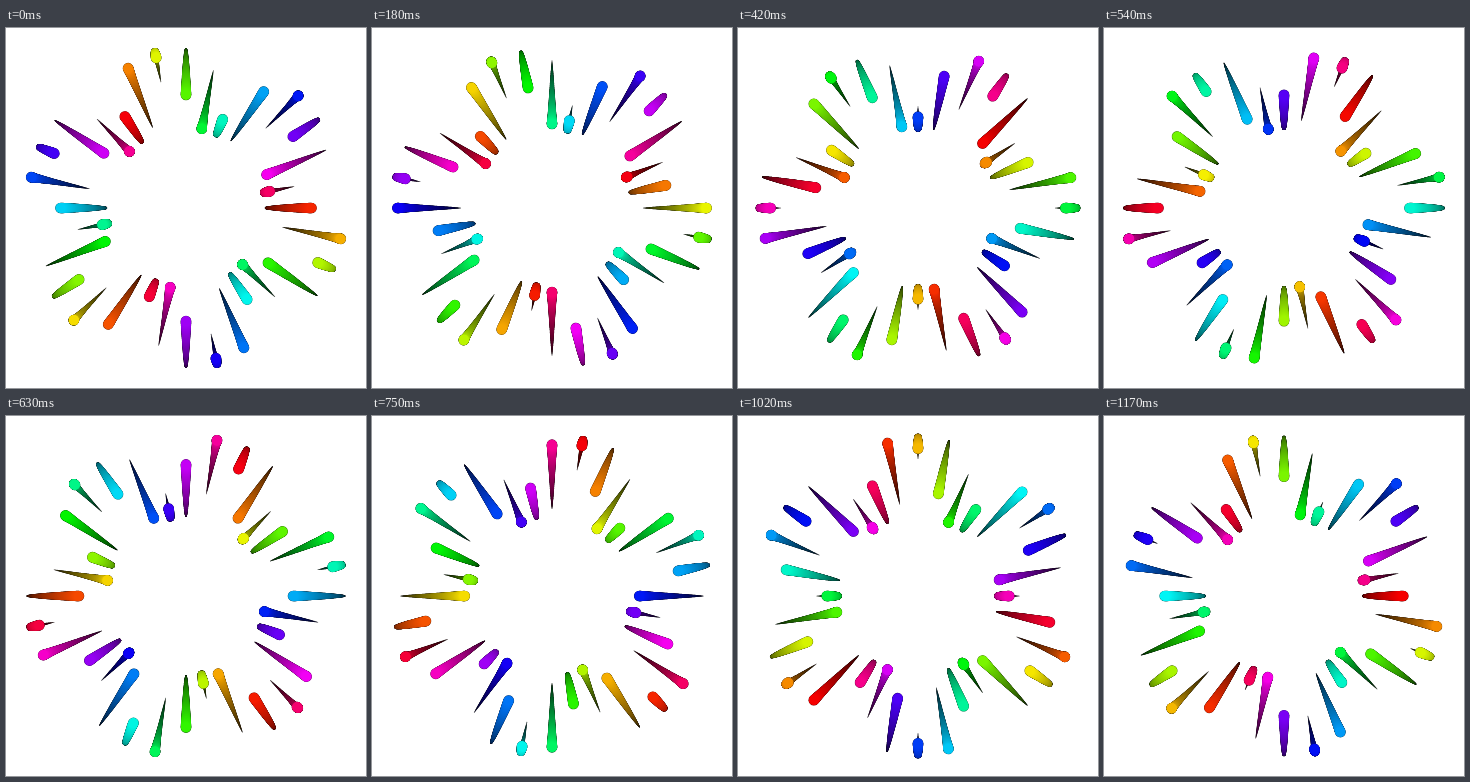
An HTML page with a canvas for the animation above (1200 ms loop, 360 by 360 pixels).

```html
<!DOCTYPE html>
<html>
<head>
<meta charset="utf-8">
<style>
  html, body { margin: 0; overflow: hidden; background: #fff; }
  canvas { display: block; }
</style>
</head>
<body>
<canvas id="stage" width="360" height="360"></canvas>
<script>
const ctx = document.getElementById('stage').getContext('2d');
const SPOKES = 32, STEPS = 40, STEP_MS = 30;
const MID = 119.3, SWING = 39.6, HEAD = 5, TRAIL = 108;
const rad = deg => deg * Math.PI / 180;

function dot(x, radius, color) {
  ctx.fillStyle = color;
  ctx.beginPath();
  ctx.arc(x, 0, radius, 0, 2 * Math.PI);
  ctx.fill();
}

// A comet swinging along the x axis; its trail is where it was up to TRAIL degrees ago.
function comet(phase, hue) {
  const pass = (grow, shade) => {
    for (let age = TRAIL; age >= 0; age--) {
      const life = 1 - age / TRAIL;
      const x = MID + SWING * Math.sin(rad(phase - age));
      const light = shade * (0.15 + 0.85 * life);
      dot(x, HEAD * life + grow, `hsl(${hue}, 100%, ${light}%)`);
    }
  };
  pass(0.35, 22); // dark rim
  pass(0, 48);
}

function draw(now) {
  const turn = (Math.floor(now / STEP_MS) % STEPS + 1) * 360 / STEPS;
  ctx.clearRect(0, 0, 360, 360);
  for (let i = 0; i < SPOKES; i++) {
    const angle = i * 360 / SPOKES;
    ctx.save();
    ctx.translate(180, 180);
    ctx.rotate(rad(angle));
    comet(turn + 6 * angle, (turn + 3 * angle) % 360);
    ctx.restore();
  }
}

const start = performance.now();
function tick() {
  draw(performance.now() - start);
  requestAnimationFrame(tick);
}
tick();
</script>
</body>
</html>
```
